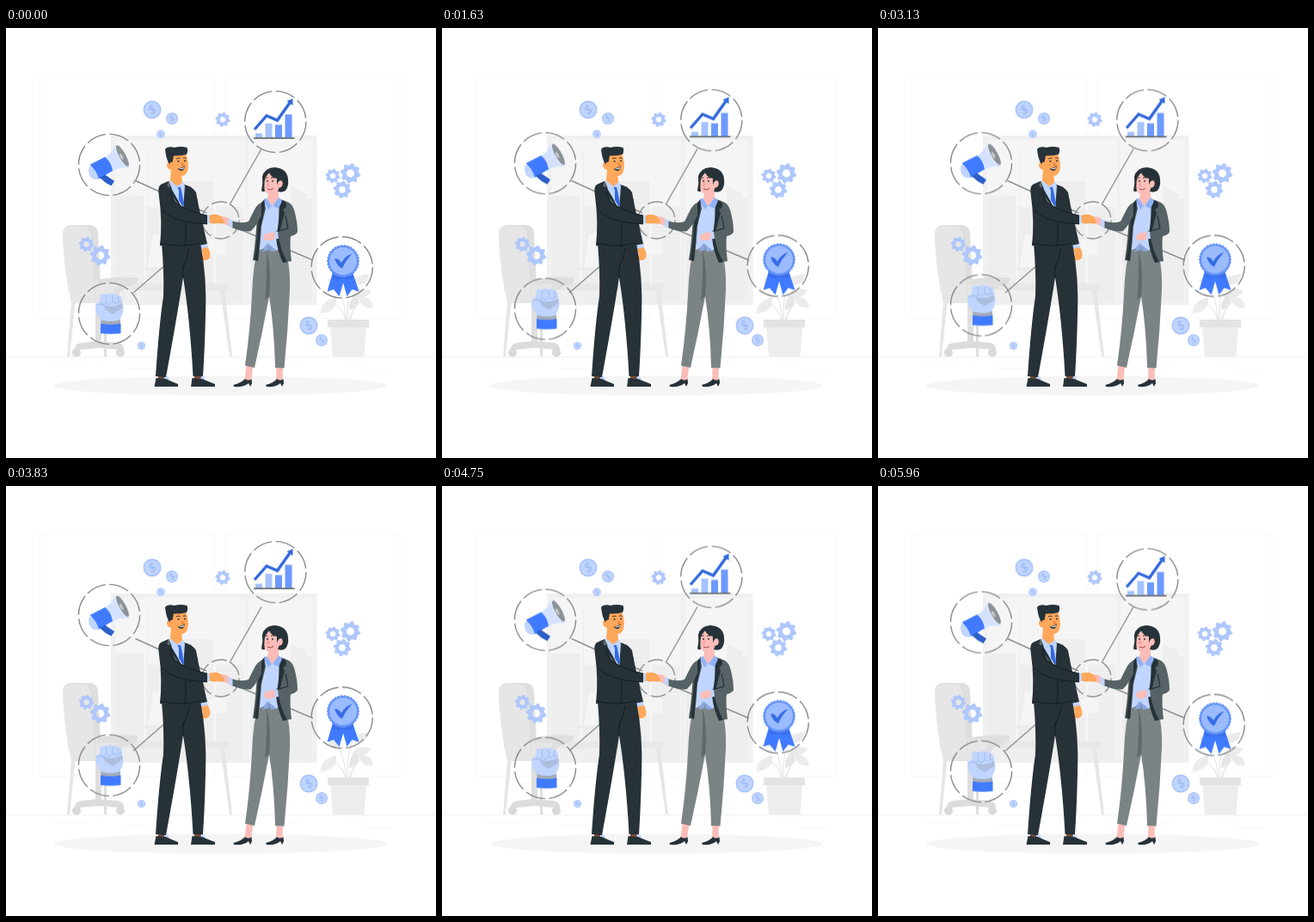
Recreate the animation shown at these times as an HTML page. Size 500 px wide and 500 px high, loop 6000 ms.

```html
<!DOCTYPE html>
<html lang="en">
<head>
<meta charset="utf-8">
<title>Business handshake</title>
<style>
  html, body { margin: 0; width: 100%; height: 100%; overflow: hidden; background: #fff; }
  svg { display: block; width: 100vw; height: 100vh; }
  text { font-family: Lato, Arial, sans-serif; font-weight: 700; text-anchor: middle; }
  .ring { fill: none; stroke: #85898b; stroke-width: 1.4; stroke-dasharray: 23.5 4.46; }
  .link { fill: none; stroke: #8e9193; stroke-width: 1.4; }
  .suit { fill: #263238; }
  .fold { fill: none; stroke: #10181c; stroke-width: .8; }
  .skinM { fill: #ffa75a; }
  .skinW { fill: #fbbdb8; }
  .shirt { fill: #c0d5ff; }
  .blue { fill: #407bff; }
  .faint { fill: none; stroke: #f8f8f8; }
</style>
</head>
<body>
<svg viewBox="0 0 500 500">
  <defs>
    <pattern id="panes" width="3" height="4" patternUnits="userSpaceOnUse">
      <rect width="3" height="4" fill="#ededed"/>
      <rect x="1" y="1" width="1.2" height="1.6" fill="#f4f4f4"/>
    </pattern>
  </defs>

  <!-- room -->
  <g class="faint">
    <path d="M39.5 55.5H242.500V337.500H39.500ZM255.500 55.500H458V337.500H255.500Z"/>
    <path d="M0 382.500H500" stroke="#f2f2f2"/>
    <path d="M416 398.500H449M330 391.500H339M396 389.500H415M52 390.500H95M105 390.500H111M136 395.500H180"/>
  </g>

  <!-- window and skyline -->
  <path fill="#f0f0f0" d="M122 125H361.500V322H122Z"/>
  <path fill="#f5f5f5" d="M127 130H278V317H127ZM282 130H356.500V317H282Z"/>
  <path fill="url(#panes)" d="M127 195H160V317H127ZM163 208H187V317H163ZM188 178H241V317H188ZM244 208H276V317H244ZM284 214H302V317H284ZM331 183L349 192V198H356V317H318V225H331Z"/>
  <path fill="none" stroke="#ececec" d="M164.500 144V208M276 209V317"/>

  <!-- desk and laptop -->
  <path fill="#f5f5f5" stroke="#e9e9e9" d="M170 239H211L206 279H164Z"/>
  <path fill="#ebebeb" d="M160 279H214V282H160Z"/>
  <path fill="#f5f5f5" d="M236 247H256V264H236Z"/>
  <path fill="#e8e8e8" d="M72 297H258V305H72Z"/>
  <path fill="#e6e6e6" d="M249 305H254L263 382H260ZM77 305H82L74 382H71Z"/>
  <path fill="#efefef" d="M140 305H249V321H140Z"/>

  <!-- chair -->
  <path fill="#dedede" d="M66 240Q66 229 78 229H97Q106 229 107 239L111 320H79Q67 281 66 240Z"/>
  <path fill="#e6e6e6" d="M66 240Q66 230 78 230H89Q98 231 99 244L104 320H76Q67 281 66 240Z"/>
  <path fill="#e6e6e6" d="M104 293H148L134 302L126 320H104Z"/>
  <path fill="#dfdfdf" d="M106 293Q126 288 152 290Q156 293 150 298Q138 301 133 306L127 320H121Q123 308 130 299Q118 296 106 299Z"/>
  <path fill="#dedede" d="M104 320H111V366H104ZM114 320H117V382H114Z"/>
  <path fill="#dcdcdc" d="M80 373Q80 367 88 366L106 364L130 366Q137 367 137 374H132L108 372L86 374Z"/>
  <g fill="#d9d9d9"><circle cx="82" cy="377.500" r="5"/><circle cx="133" cy="377.500" r="5"/></g>

  <!-- plant -->
  <path fill="none" stroke="#e3e3e3" d="M395 340Q391 322 376 319M397 340Q396 300 410 287M399 340Q404 325 414 316M396 340Q393 310 382 298M400 340Q404 322 418 305"/>
  <g fill="#ebebeb">
    <path d="M366 332Q365 318 384 313Q386 330 366 332Z"/>
    <path d="M405 299Q404 287 422 286Q420 300 405 299Z"/>
    <path d="M401 313Q408 299 425 305Q419 317 401 313Z"/>
    <path d="M410 313Q425 311 427 325Q413 327 410 313Z"/>
    <path d="M399 328Q398 316 407 310Q416 322 399 328Z" fill="#e6e6e6"/>
    <path d="M390 306Q376 305 374 292Q389 291 390 306Z"/>
  </g>
  <path fill="#ededed" d="M377 347H419L416.500 382H380Z"/>
  <path fill="#e3e3e3" d="M374 339H422V348H374Z"/>

  <ellipse cx="249.500" cy="416" rx="193.500" ry="11.500" fill="#f5f5f5"/>

  <!-- links -->
  <path class="link" d="M150.500 177.500L233 215M148 308L190 271.500M297 140.500L260 205.500M267 232L357 270"/>
  <circle class="link" cx="249.500" cy="223.500" r="21.500" stroke-dasharray="18 4.500"/>

  <g id="trinkets"></g>

  <!-- floating badges -->
  <g class="fast">
    <circle class="ring" cx="120" cy="159" r="35.600"/>
    <path class="shirt" d="M97 161Q94 167 99 174Q104 178 109 175L104 160Z"/>
    <path fill="#d5e2ff" d="M114 151Q123 146 127 136L143 163Q132 161 123 167Z"/>
    <path class="blue" d="M97.500 159L115 150Q122 155 124 166L108 175.500Q105 165 97.500 159Z"/>
    <path fill="#2d5fc9" d="M109 174L115 170.500L126 178L122.500 183.500L116 180Z"/>
    <g transform="rotate(-29 135 149)">
      <ellipse cx="135" cy="149" rx="4.800" ry="15" fill="#dfe8fb"/>
      <ellipse cx="135.500" cy="149" rx="3.800" ry="13.700" fill="#8c9295"/>
      <ellipse cx="134" cy="149" rx="1.500" ry="4" fill="#c5cbd0"/>
    </g>
  </g>

  <g class="fast">
    <circle class="ring" cx="313.300" cy="109" r="35.600"/>
    <path fill="#a5c2ff" d="M290 122.500H298V128H290ZM301.500 111H309.500V128H301.500Z"/>
    <path fill="#6d9aff" d="M313 112.500H321V128H313ZM324.500 100.500H332.500V128H324.500Z"/>
    <path stroke="#6a7073" stroke-width="1.800" d="M288 128.200H335.500"/>
    <path fill="none" stroke="#3369dc" stroke-width="3.400" d="M289 118L303 102L315.500 107.300L331 85.500"/>
    <path fill="#3369dc" d="M333.500 82L326.500 85L333.500 90Z"/>
  </g>

  <g class="fast">
    <circle class="ring" cx="390.700" cy="278.300" r="35.600"/>
    <path class="blue" d="M380 284L373.500 306.500L381 304L387.500 312L394 290Z"/>
    <path class="blue" d="M390 289L396.500 312L402.500 304L410.500 306.500L403 284Z"/>
    <path fill="#2f62cf" d="M382 284Q392 292 402 284L405 291Q398 294 392 291Q386 294 379 291Z" opacity=".4"/>
    <path id="seal" fill="#6594f7"/>
    <circle cx="392" cy="271" r="16" fill="#9bbbff"/>
    <path fill="#356de6" d="M382 268.500Q386 267 390 273Q394 265 402.500 262.500Q395 270 391 279.500Q386 278 382 268.500Z"/>
  </g>

  <g class="slow">
    <circle class="ring" cx="120" cy="332" r="35.600"/>
    <path class="shirt" d="M110 332H133V346H110Z"/>
    <path fill="#a3abb8" d="M110.500 339Q122 343 133 339V346H110.500Z"/>
    <path class="blue" d="M110 343.500Q122 346 133.500 343.500V355Q122 356.500 110 355Z"/>
    <path class="shirt" d="M104 324Q105 319 109 319L109.500 311Q112 307.500 116.500 310Q120 307 124 309.500Q128 307.500 130.500 311Q134.500 311 134.500 316L136.500 326Q136 335 131 339Q122 343 111 339Q104 333 104 324Z"/>
    <path fill="#aebfde" d="M113 323Q124 326 135 320Q137 326 132 328L124 333L116 328Z"/>
    <path fill="none" stroke="#9cb4e2" stroke-width=".7" d="M109.500 319Q113 324 116.500 319V310M116.500 319Q120 324 124 318.500V310M124 318.500Q128 322 130.500 318V311M130.500 318Q133 320 134.500 317M105 322Q112 320 119 324Q128 325 125 329"/>
  </g>

  <!-- man -->
  <g>
    <path class="skinM" d="M226 256L234 254Q239 262 237 267Q234 271 229 270Q226 268 229 263Z"/>
    <path class="shirt" d="M224 252L233 250L234.500 255L226 257Z"/>
    <path class="suit" d="M214 184Q222 190 224 207L234 251L223 253L210 225Z"/>
    <path fill="#7c4a35" d="M177 402H185V409H177ZM219 402H227V409H219Z"/>
    <path class="shirt" d="M184 405H188L190 409L184 409ZM227 405H230L232 409H226Z"/>
    <path class="suit" d="M181 250H226Q234 290 232 335Q231 375 229 405H217.500Q214 340 206 290Q199 335 186 406L174 405Q178 345 183 312Q184 285 181 250Z"/>
    <path class="fold" d="M206 290Q205 284 207 274M213 256Q211 270 205 280"/>
    <path class="suit" d="M174.500 407L186 408Q192 411 200 414V417H172.500ZM216.500 407L228 408Q235 411 243 414V417H215Z"/>
    <path class="skinM" d="M192 163H204L205 182L198 188L191 178Z"/>
    <path class="suit" d="M189 178L206 212L207 182Q216 184 221 191Q224 207 223 222L226 252Q203 258 179 253Q182 225 178 196Q176 184 180 182Z"/>
    <path class="shirt" d="M189.500 176L199 184L206 179L208 184L206 210L193 188Z"/>
    <path fill="#3369dc" d="M199.500 185H203L204 189L207 204L205.500 208L201 200L201 189Z"/>
    <path fill="#5f686c" d="M189 178L192 184L187 187L190 191L206 212L193 198L185 189Z"/>
    <path class="fold" d="M206 212Q211 230 208 254M179 250Q203 256 225 250"/>
    <path class="shirt" d="M232 218L237 217.500L238 227L232 227Z"/>
    <path class="suit" d="M178 190Q179 181 186 182Q193 188 196 202Q212 213 234 218L234 228Q207 229 190 219Q179 211 178 190Z"/>
    <path class="fold" d="M191 190Q193 200 196 203Q212 214 234 218M181 211Q194 226 234 228"/>
    <path class="skinM" d="M190 149L209 146Q213 157 211.500 164Q210 172 204 172Q196 172 192 165Q187 164 187 159Q188 155 191 156Z"/>
    <path class="suit" d="M185 141Q188 137 196 139Q203 137 210.500 139Q212 143 210 147Q202 149 195 148.500L193.500 156Q191 155 190 158.500Q186 152 185 141Z"/>
    <path fill="#e98335" d="M204 155L207.500 160L204.500 161Z"/>
    <path class="suit" d="M199.500 163Q204 164 208 160Q207 166 204 166Q201 166 199.500 163Z"/>
    <path fill="#fff" d="M200.500 163.300Q204 164 207.500 161.500L206.500 163.500Q203 165 200.500 163.300Z"/>
    <g class="suit"><circle cx="200.500" cy="155" r="1"/><circle cx="208" cy="154.500" r="1"/></g>
    <path class="fold" d="M198 152Q200 150.500 202.500 151.500M206 151.300Q208 150.300 209.500 151.500"/>
  </g>

  <!-- woman -->
  <g>
    <path class="skinW" d="M279.500 392H287.500L285 410L277 413ZM314.500 392H322L321.500 410L314 413Z"/>
    <path class="suit" d="M264.500 415Q273 413 278 408Q282 411 285.500 408L286 413L284 417L282 413Q277 418 265 417ZM302 415Q311 413 315 408Q319 411 322.500 408L323 413L321 417L319 413Q314 418 303 417Z"/>
    <path fill="#7b8485" d="M294 252H322Q331 270 330 305Q328 350 323.500 395.500L313 395Q312 350 306 312Q298 355 289 395L278 392.500Q284 350 286 310Q287 275 294 252Z"/>
    <path fill="#5f696b" d="M303 258Q304 290 301 316L306 312Q309 280 303 258Z"/>
    <path class="shirt" d="M300 198L318 198L324 215L318 257Q310 262 304 251Q298 260 293 257Z"/>
    <path fill="#8ba8e2" d="M304 250L306 258L298 260ZM304 250L315 259L308 260Z"/>
    <path fill="#455153" d="M300 200Q294 204 292 215Q291 245 287 270L293 271Q296 250 297 230L302 210Z"/>
    <path class="suit" d="M301 199Q296 203 294 213Q294 235 289 269L293 271L296 232L300 212Z"/>
    <path fill="#566265" d="M318 199Q328 201 332 207L335 228Q328 240 332 271L322 273Q316 255 315 243Q319 220 318 199Z"/>
    <path class="suit" d="M317 199L325 202L327 208L322 211L324 215Q321 225 317 243Q319 258 327 272L322 273Q315 258 314 243Q319 222 317 199Z"/>
    <path class="skinW" d="M306 186H317L317 198L309 207L304 199Z"/>
    <path fill="#91b2f7" d="M303 198L309 207L305 211L300 201ZM317 197L310 207L317 210L321 201Z"/>
    <path fill="#566265" d="M297 203Q293 204 289 211L282 225Q273 228 262 224V232Q278 238 285 236Q292 229 297 218Z"/>
    <path class="shirt" d="M258 221.500L263.500 223.500V232.500L258 230Z"/>
    <path fill="#566265" d="M327 202Q333 204 335.500 213Q339 226 339 237Q337 243 314 245L313 237L328 233L324 214Z"/>
    <path class="fold" d="M325 218Q327 227 328 233L314 237" stroke="#323e42"/>
    <path class="shirt" d="M312 237L316 236.500L317 245L312 245.500Z"/>
    <path class="skinW" d="M312.500 237.500Q305 237 300 241Q299 244 302 247Q307 248 312.500 245.500Z"/>
    <path class="skinW" d="M300 171Q308 167 319 172L318 187Q314 194 308 193.500Q301 193 300 184Z"/>
    <path class="suit" d="M298 173Q300 163 312 162Q327 163 328 176Q329 184 325 189Q321 192 316 190L318 184Q314 182 315 175Q309 174 306 168.500Q301 173 300.500 180Q300 185 301 190Q298 191 297 189Q299 181 298 173Z"/>
    <path class="skinW" d="M316 180Q318 176 321 178Q323 182 320 185Q317 187 316 184Z"/>
    <path fill="#f09c9c" d="M305 178L303 183.500L306 184Z"/>
    <g class="suit"><circle cx="304" cy="178" r=".9"/><circle cx="310" cy="178" r=".9"/></g>
    <path fill="none" stroke="#a3323e" stroke-width=".9" d="M304 187Q307 189.500 311 186.500"/>
    <path class="fold" d="M308 174.500Q310 173 312 174.500M302.500 174.500L304.500 174"/>
  </g>

  <!-- handshake -->
  <path class="skinW" d="M259 222Q252 218 247 219.500L249 226L259 230Z"/>
  <path class="skinM" d="M236.500 218Q244 215.500 248 218L255 222Q256 224 253 224L254 226Q252 229 247 227Q241 228 237 226.500Z"/>
  <path class="skinW" d="M259 221Q253 218.500 250.500 220.500Q253 223 255 224Q256 228 259 229.500Z"/>
</svg>

<script>
  const TAU = Math.PI * 2;

  // Closed outline from polar steps: radius(i) for i in 0..count-1.
  function polar(cx, cy, count, radius, turn = 0) {
    let d = "";
    for (let i = 0; i < count; i++) {
      const a = i / count * TAU + turn, r = radius(i);
      d += (i ? "L" : "M") + (cx + r * Math.cos(a)).toFixed(2) + " " + (cy + r * Math.sin(a)).toFixed(2);
    }
    return d + "Z";
  }

  function gear(x, y, r) {
    const teeth = polar(x, y, 32, i => i % 4 < 2 ? r : r * 0.8, 0.1);
    const hole = polar(x, y, 24, () => r * 0.42);
    return `<path d="${teeth}${hole}" fill="#aec7fc" fill-rule="evenodd" stroke="#aec7fc" stroke-width=".6" stroke-linejoin="round"/>`;
  }

  function coin(x, y, r) {
    return `<circle cx="${x}" cy="${y}" r="${r}" fill="#a9c4fb"/>
      <circle cx="${x}" cy="${y}" r="${r * 0.84}" fill="#bfd4ff"/>
      <text x="${x}" y="${y + r * 0.46}" font-size="${r * 1.3}" fill="#a0bcf6" transform="rotate(-25 ${x} ${y})">$</text>`;
  }

  const gears = [[252, 106.5, 8.3], [380, 172, 8.2], [400.5, 169, 11.5], [391, 188, 10], [93.5, 251.5, 8.5], [109.5, 264.5, 11.5]];
  const coins = [[170, 95, 10.5], [193, 105.3, 7], [180, 123.3, 4.8], [352, 346, 10.5], [367, 363, 7], [157.5, 369.5, 4.6]];

  document.getElementById("trinkets").innerHTML =
    gears.map(g => gear(...g)).join("") + coins.map(c => coin(...c)).join("");
  document.getElementById("seal").setAttribute("d", polar(392, 271, 60, i => i % 2 ? 18 : 19.3));

  function float(selector, duration) {
    const steps = [0, -10, 0].map(y => ({ transform: `translateY(${y}px)` }));
    for (const el of document.querySelectorAll(selector)) {
      el.animate(steps, { duration, iterations: Infinity, easing: "linear" });
    }
  }

  float(".fast", 1500);
  float(".slow", 6000);
</script>
</body>
</html>
```
